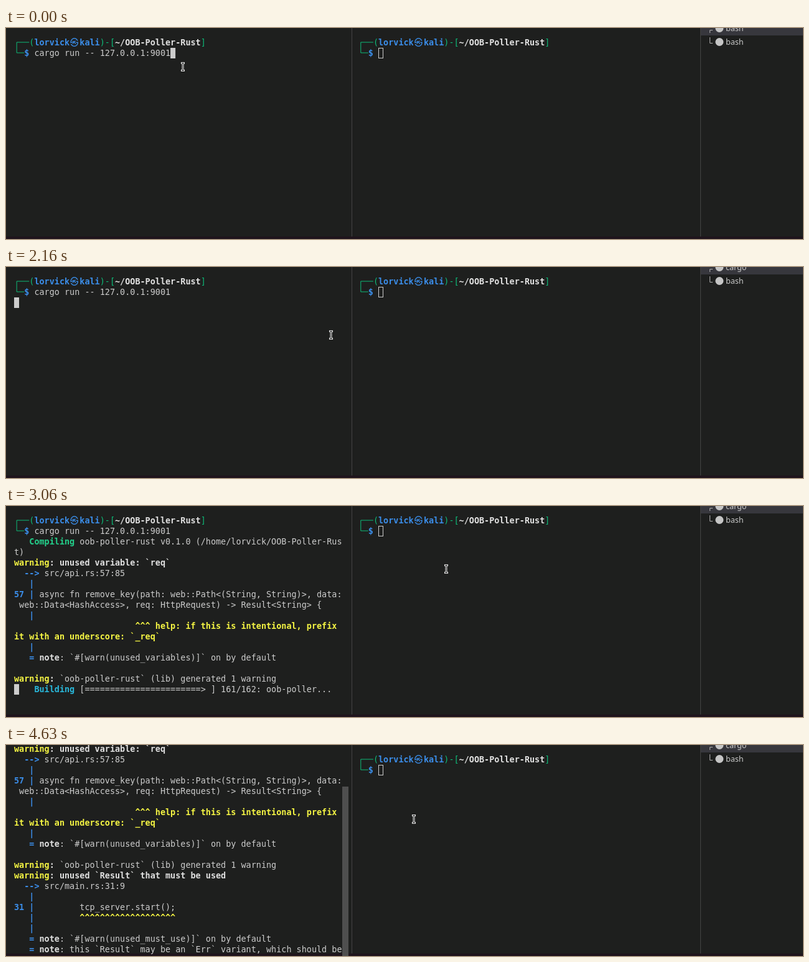
Animation of 1280x340 px, one loop 8 s. Source, as an HTML page with a canvas:

```html
<!DOCTYPE html>
<html lang="en">
<head>
<meta charset="utf-8">
<title>Terminal: cargo run</title>
<style>
html, body { margin: 0; height: 100%; overflow: hidden; background: #1e1f1e; }
canvas { display: block; }
</style>
</head>
<body>
<canvas id="stage" width="1280" height="340"></canvas>
<script>
const ctx = document.getElementById('stage').getContext('2d');
const LOOP = 8000, CELL = 8.1, ROW = 17, LEFT = 13, RIGHT = 565.6;
const BG = '#1e1f1e', GREEN = '#0dbc79';
const MONO = '13.45px "DejaVu Sans Mono", "Noto Sans CJK KR", "Noto Sans CJK JP", monospace';
const SANS = '12.48px "Noto Sans", "Open Sans", sans-serif';

// Style keys used after § in the lines: colour, then bold or not
const STYLES = {
  n: ['#cccccc', false],
  g: [GREEN, false],
  w: ['#e0e0e0', true],
  b: ['#3b8eea', true],
  y: ['#f5f543', true],
  c: ['#29b8db', true],
  G: ['#23d18b', true]
};

const PROMPT = '§g   (§blorvick㉿kali§g)-[§w~/OOB-Poller-Rust§g]';
const BAR = '§b   |';
const LINES = [
  PROMPT,
  '§b  $§n cargo run -- 127.0.0.1:9001',
  '§G   Compiling§n oob-poller-rust v0.1.0 (/home/lorvick/OOB-Poller-Rus',
  '§nt)',
  '§ywarning§w: unused variable: `req`',
  '§b  -->§n src/api.rs:57:85',
  BAR,
  '§b57 |§n async fn remove_key(path: web::Path<(String, String)>, data:',
  '§n web::Data<HashAccess>, req: HttpRequest) -> Result<String> {',
  BAR,
  '§y' + ' '.repeat(24) + '^^^ help: if this is intentional, prefix',
  '§yit with an underscore: `_req`',
  BAR,
  '§b   =§w note§n: `#[warn(unused_variables)]` on by default',
  '§n',
  '§ywarning§w:§n `oob-poller-rust` (lib) generated 1 warning',
  '§ywarning§w: unused `Result` that must be used',
  '§b  -->§n src/main.rs:31:9',
  BAR,
  '§b31 |§n         tcp_server.start();',
  BAR + '§y         ' + '^'.repeat(19),
  BAR,
  '§b   =§w note§n: `#[warn(unused_must_use)]` on by default',
  '§b   =§w note§n: this `Result` may be an `Err` variant, which should be'
];

// [time, visible lines, crates built, scrolled rows]
const OUTPUT = [
  [0, 2, 0, 0], [2300, 4, 160, 0], [2570, 15, 160, 0],
  [3060, 16, 161, 0], [3440, 24, 0, 5]
];
// [time, x, y]
const POINTER = [
  [0, 284, 62.5], [950, 294, 66.5], [1900, 300, 70.5], [2020, 308, 75.5],
  [2160, 522, 109.5], [2300, 605, 113.5], [2420, 657, 115.5],
  [2570, 695, 114.5], [2690, 709, 112.5], [2940, 708, 107.5],
  [3060, 707, 101.5], [3180, 706, 97.5], [4630, 655, 119.5]
];

const at = (steps, t) => steps.findLast(step => step[0] <= t);

function rect(x, y, w, h, color) {
  ctx.fillStyle = color;
  ctx.fillRect(x, y, w, h);
}

function line(points, color, width = 1) {
  ctx.beginPath();
  points.forEach(([x, y]) => ctx.lineTo(x, y));
  ctx.strokeStyle = color;
  ctx.lineWidth = width;
  ctx.stroke();
}

function print(text, x, row) {
  for (const run of text.split('§').slice(1)) {
    const [color, bold] = STYLES[run[0]];
    ctx.fillStyle = color;
    ctx.font = (bold ? 'bold ' : '') + MONO;
    for (const ch of run.slice(1)) {
      const wide = ch === '㉿';
      ctx.fillText(ch, x + (wide ? 1 : 0), 28 + ROW * row);
      x += CELL * (wide ? 2 : 1);
    }
  }
}

function bracket(x) {
  line([[x + 24.3, 23], [x + 4.2, 23], [x + 4.2, 40], [x + 16.2, 40]], GREEN);
}

function block(col, row) {
  rect(LEFT + col * CELL, 15 + ROW * row, 8, 17, '#cccccc');
}

function terminal(t) {
  const [, count, built, scroll] = at(OUTPUT, t);
  LINES.slice(0, count).forEach((text, i) => print(text, LEFT, i - scroll));
  if (!scroll) bracket(LEFT);
  if (built) {
    print(`§c    Building§n [${'='.repeat(23)}> ] ${built}/162: oob-poller...`, LEFT, count);
  }
  if (t < 1900) block(31, 1);
  else if (!scroll) block(0, count);
  else rect(540, 67, 10, 273, '#4f4f4f');
}

function idleTerminal() {
  print(PROMPT, RIGHT, 0);
  print('§b  $', RIGHT, 1);
  bracket(RIGHT);
  ctx.strokeStyle = '#cccccc';
  ctx.lineWidth = 1;
  ctx.strokeRect(598.5, 32.5, 7, 16);
}

function tab(label, y) {
  ctx.beginPath();
  ctx.arc(1145.8, y, 6.5, 0, 7);
  ctx.fillStyle = '#c5c5c5';
  ctx.fill();
  ctx.font = SANS;
  ctx.fillStyle = '#cccccc';
  ctx.fillText(label, 1156, y + 4.5);
}

function sidebar(t) {
  rect(1116, 0, 164, 12, '#37373d');
  tab(t < 1900 ? 'bash' : 'cargo', 0.5);
  tab('bash', 22.5);
  line([[1135, 3.5], [1130.5, 3.5], [1130.5, 8]], '#b0b0b0');
  line([[1130.5, 15], [1130.5, 24.5], [1135, 24.5]], '#b0b0b0');
}

function pointer(x, y) {
  for (const [color, width, reach] of [['#e4e4e4', 3, 3], ['#222222', 1, 2]]) {
    line([[x, y - 6], [x, y + 6]], color, width);
    for (const end of [-6, 6]) line([[x - reach, y + end], [x + reach, y + end]], color, width);
  }
}

function draw(now) {
  const t = now % LOOP;
  rect(0, 0, 1280, 340, BG);
  rect(0, 336, 1280, 4, '#1f141c');
  rect(555, 0, 1, 336, '#444444');
  rect(1115, 0, 1, 336, '#444444');
  terminal(t);
  idleTerminal();
  sidebar(t);
  pointer(...at(POINTER, t).slice(1));
}

const start = performance.now();
function tick() {
  draw(performance.now() - start);
  requestAnimationFrame(tick);
}
tick();
</script>
</body>
</html>
```
